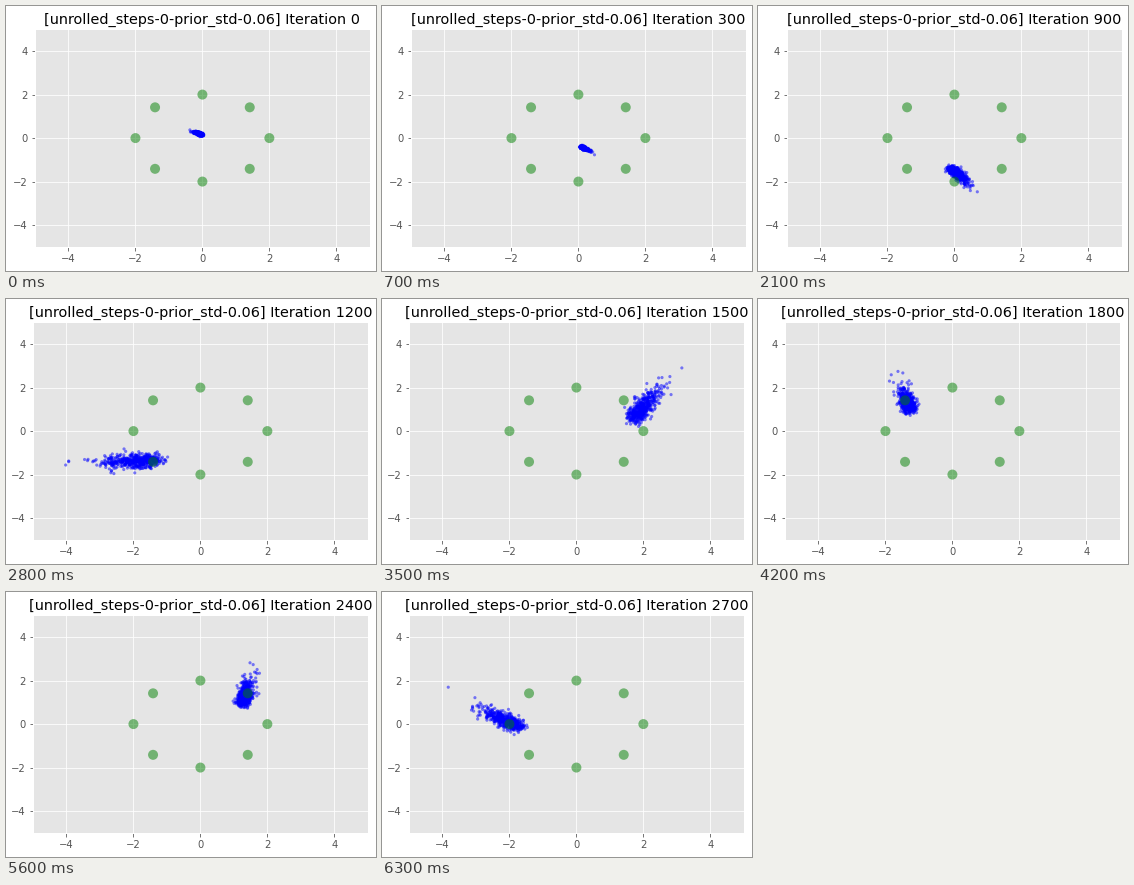
Animation, 370 px wide and 265 px high, one loop 7000 ms. Source, as a matplotlib script:

```python
import numpy as np
import matplotlib.pyplot as plt
from matplotlib.animation import FuncAnimation

W, H, DPI = 370, 265, 72
STEP, FRAMES, HOLD = 300, 10, 700
N = 512

# cloud centre (radius, direction in degrees) and the side it leans to
KEYS = [(0.22, 116, 1), (0.5, -70, 1), (1.9, -66, 1), (1.65, -87, 1),
        (2.36, 216, -1), (2.27, 29, 1), (1.9, 135, -1), (1.75, -83, -1),
        (1.9, 45, 1), (2.1, 176, -1)]

plt.style.use("ggplot")
plt.rcParams["font.family"] = "DejaVu Sans"


def arc(rng):
    """Long band that bends down to the right."""
    x = rng.normal(0.7, 1.0, N)
    y = -1.25 - 0.65 * x - 0.65 * np.maximum(x - 1, 0)
    return x, y + rng.normal(0, 0.17, N)


def blob(rng, radius, turn, side):
    """Cloud with its tail outwards; farther clouds are larger."""
    turn = np.radians(turn)
    tilt = turn + side * np.radians(33)
    spread = max(0.08, 0.35 * (radius - 1))
    u = spread * (rng.gamma(6, 1, N) - 6) / np.sqrt(6)
    v = 0.37 * spread * rng.normal(size=N)
    x = radius * np.cos(turn) + u * np.cos(tilt) - v * np.sin(tilt)
    y = radius * np.sin(turn) + u * np.sin(tilt) + v * np.cos(tilt)
    return x, y


def cloud(i):
    rng = np.random.default_rng(40 + i)
    return arc(rng) if i == 2 else blob(rng, *KEYS[i])


fig = plt.figure(figsize=(W / DPI, H / DPI), dpi=DPI, facecolor="white")
ax = fig.add_axes([0, 0, 1, 1])
ticks = range(-4, 5, 2)
ax.set(xlim=(-5, 5), ylim=(-5, 5), xticks=ticks, yticks=ticks)

dots = dict(alpha=0.5, edgecolors="none")
samples = ax.scatter([], [], s=10, c="b", **dots)
angle = np.arange(8) * np.pi / 4
ax.scatter(2 * np.cos(angle), 2 * np.sin(angle), s=100, c="g", **dots)
title = ax.set_title("")


def draw(i):
    # the wider four-digit title pushes the plot to the left
    left = 29 if i * STEP < 1000 else 27
    ax.set_position([left / W, 24.2 / H, 334.8 / W, 217.44 / H])
    samples.set_offsets(np.column_stack(cloud(i)))
    title.set_text(f"[unrolled_steps-0-prior_std-0.06] Iteration {i * STEP}")
    return samples, title


anim = FuncAnimation(fig, draw, frames=FRAMES, interval=HOLD, repeat=True,
                     repeat_delay=0, blit=False)
plt.show()
```
